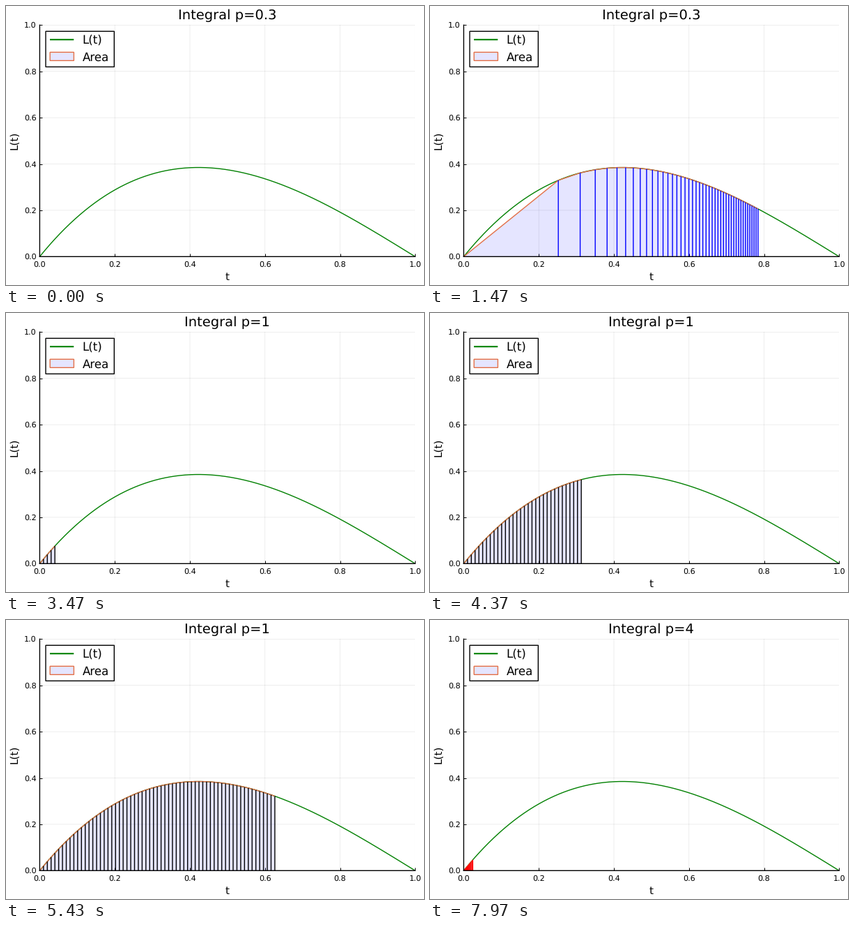
A matplotlib script for the animation above (8 s loop, 600 px wide and 400 px high).

```python
import numpy as np
import matplotlib.pyplot as plt
from matplotlib.animation import FuncAnimation
from matplotlib.collections import LineCollection
from matplotlib.patches import Polygon, Rectangle

plt.rcParams.update({
    "font.family": "DejaVu Sans",
    "text.hinting": "none",
    "path.snap": False,
})

W, H, DPI = 600, 400, 100
X0, X1, Y0, Y1 = 48.4, 587.3, 359.3, 27.3   # plot box in pixels, y downwards
LOOP_MS, FRAMES = 8000, 240
PARTS = 99                                  # subintervals in each partition
RUNS = [(0.3, "blue"), (1, "black"), (4, "red")]
ORANGE = (0.889, 0.436, 0.278)
FILL = (0, 0, 1, 0.1)


def curve(t):
    return t * (1 - t) * (2 - t)


fig = plt.figure(figsize=(W / DPI, H / DPI), dpi=DPI, facecolor="white")
ax = fig.add_axes([X0 / W, 1 - Y0 / H, (X1 - X0) / W, (Y0 - Y1) / H])
ax.set(xlim=(0, 1), ylim=(0, 1))
ticks = np.linspace(0, 1, 6)
ax.set_xticks(ticks)
ax.set_yticks(ticks)
ax.set_axisbelow(True)
ax.grid(color="black", alpha=0.1, lw=0.5)
ax.tick_params(direction="in", length=2.9, width=0.7,
               labelbottom=False, labelleft=False)
for side, spine in ax.spines.items():
    spine.set_visible(side in ("left", "bottom"))
    spine.set(linewidth=1, zorder=6)

# Overlay in pixel coordinates for text and legend
page = fig.add_axes([0, 0, 1, 1])
page.set(xlim=(0, W), ylim=(H, 0))
page.axis("off")


def label(x, y, text, size, ha="center", **kw):
    return page.text(x, y, text, fontsize=size, ha=ha, va="baseline", **kw)


for v in ticks:
    label(X0 + v * (X1 - X0), 374, f"{v:.1f}", 8)
    label(43.5, Y0 + v * (Y1 - Y0) + 4, f"{v:.1f}", 8, ha="right")
title = label((X0 + X1) / 2, 19, "", 14)
label((X0 + X1) / 2, 393, "t", 11)
label(17, (Y0 + Y1) / 2, "L(t)", 11, rotation=90,
      rotation_mode="anchor")

page.add_patch(Rectangle((57, 36.3), 98.3, 51, fc="white", ec="black", lw=1))
page.plot([63, 97.3], [48.2, 48.2], color="green", lw=1.5,
          solid_capstyle="butt")
page.add_patch(Rectangle((63.2, 66.3), 34.2, 12, fc=FILL, ec=ORANGE, lw=1))
label(109.7, 55, "L(t)", 12, ha="left")
label(109.7, 79, "Area", 12, ha="left")

t = np.linspace(0, 1, 300)
ax.plot(t, curve(t), color="green", lw=1, zorder=2)
area = Polygon([(0, 0), (0, 0)], fc=FILL, ec="none", lw=0, zorder=3)
ax.add_patch(area)
edge, = ax.plot([], [], color=ORANGE, lw=1, zorder=4, solid_capstyle="butt")
bars = LineCollection([], linewidths=1, zorder=5)
ax.add_collection(bars, autolim=False)


def draw(frame):
    run, k = divmod(frame, PARTS + 1)
    p, color = RUNS[run]
    x = (np.arange(k + 1) / PARTS) ** p
    y = curve(x)
    title.set_text(f"Integral p={p}")
    area.set_xy([(0, 0), *zip(x, y), (x[-1], 0)])
    edge.set_data(x, y)
    bars.set_segments([[(a, 0), (a, b)] for a, b in zip(x[1:], y[1:])])
    bars.set_color(color)
    return title, area, edge, bars


anim = FuncAnimation(fig, draw, frames=FRAMES, interval=LOOP_MS / FRAMES,
                     init_func=lambda: draw(0), repeat=True, repeat_delay=0)
plt.show()
```
